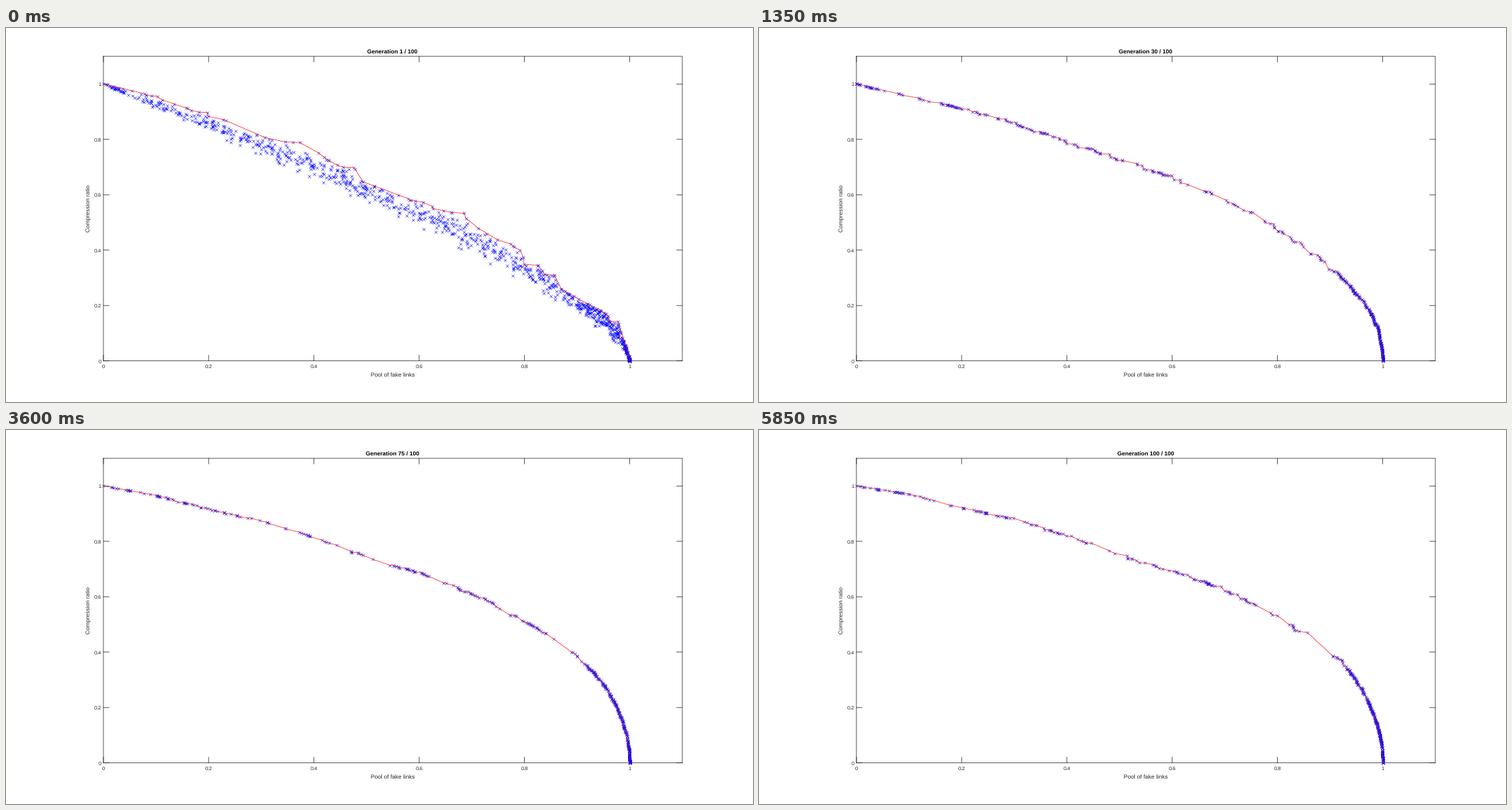
These frames come from a looping animation (1057x530 px, 6.3 s). A matplotlib script:

```python
import numpy as np
import matplotlib.pyplot as plt
from matplotlib.animation import FuncAnimation

W, H, DPI = 1057, 530, 100
PX = 72 / DPI
LEFT, RIGHT, TOP, BOTTOM = 137.9, 957.0, 40.1, 471.7
UNIT_X, UNIT_Y = (RIGHT - LEFT) / 1.1, (BOTTOM - TOP) / 1.1
GREY = "#262626"
GENERATIONS = [1, *range(10, 71, 10), *range(75, 101, 5)]

# Height of the front over KNOTS at generations 1, 20 and 100.
KNOTS = np.r_[np.arange(10) / 10, 0.95, 0.98, 1]
FIRST = [1, .952, .887, .812, .768, .660, .572, .520, .370, .240, .177, .12, 0]
EARLY = [1, .952, .908, .855, .786, .724, .656, .575, .468, .330, .230, .16, 0]
LAST = [1, .970, .921, .880, .822, .748, .694, .623, .526, .401, .297, .187, 0]


def bend(x):
    """Straightens the steep fall at x = 1, where the front is a root curve."""
    return np.sqrt(np.clip(1 - x, 0, 1))


def spread(x):
    u = bend(x)
    return (4 * u * (1 - u)) ** 0.7


def front_height(gen, x):
    early, last = np.array(EARLY), np.array(LAST)
    if gen < 20:
        mix = ((gen - 1) / 19) ** 0.7
        heights = np.array(FIRST) * (1 - mix) + early * mix
    else:
        lag = ((100 - gen) / 80) ** 1.2
        heights = last + (early - last) * lag
    return np.interp(bend(x), bend(KNOTS)[::-1], heights[::-1])


def along(gen, share):
    """Points at the given shares (0..1) of the front's length."""
    x = 1 - np.linspace(1, 0, 600) ** 2
    y = front_height(gen, x)
    dist = np.r_[0, np.cumsum(np.hypot(np.diff(x) * UNIT_X, np.diff(y) * UNIT_Y))]
    at = np.interp(np.clip(share, 0, 1), dist / dist[-1], x)
    return at, front_height(gen, at)


def front(gen, rng):
    """Members on the front, sorted into a falling staircase."""
    if gen == 1:
        share, jitter = rng.random(62), 0.009
    else:
        hubs = rng.choice(rng.random(120), 230) + rng.normal(0, 0.004, 230)
        share = np.r_[hubs, 1 - 0.17 * rng.random(200) ** 1.4]
        jitter = 0.006 if gen <= 40 else 0.004
    x, y = along(gen, np.r_[0, share, 1])
    x, y = (v + rng.normal(0, jitter, v.size) * spread(x) for v in (x, y))
    return np.sort(np.clip(x, 0, 1)), np.sort(np.clip(y, 0, 1))[::-1]


def first_cloud(line, rng):
    x = np.r_[rng.random(740) ** 0.8, 1 - 0.1 * rng.random(190) ** 2,
              0.04 * rng.random(14)]
    u = bend(x)
    half = 0.054 * spread(x)
    y = u - 0.42 * u * (1 - u) + half * np.clip(rng.normal(0, 0.5, x.size), -1.1, 1.1)
    top = np.interp(x, *line)
    y = np.where(y > top, top - rng.random(x.size) * half, y)
    return x, np.clip(y, 0, 1)


def followers(gen, rng):
    """Members that still lag behind the front in the early generations."""
    n, lag = (460, 0.014) if gen == 10 else (220, 0.007)
    share = rng.choice(rng.random(90), n) + rng.normal(0, 0.006, n)
    x, y = along(gen, share)
    off = np.minimum(rng.exponential(lag, n), 3 * lag) * spread(x)
    return np.clip(x - 0.3 * off, 0, 1), np.clip(y - off, 0, 1)


def population(gen):
    rng = np.random.default_rng(500 + gen)
    line = marks = front(gen, rng)
    if gen == 1:
        marks = np.hstack([line, first_cloud(line, rng)])
    elif gen <= 20:
        marks = np.hstack([line, followers(gen, rng)])
    return line, marks


def to_stage(points):
    x, y = points
    return LEFT + UNIT_X * x, BOTTOM - UNIT_Y * y


plt.rcParams["font.family"] = "Liberation Sans"
plt.rcParams["text.hinting"] = "none"
fig = plt.figure(figsize=(W / DPI, H / DPI), dpi=DPI, facecolor="white")
ax = fig.add_axes([0, 0, 1, 1])
ax.set_xlim(0, W)
ax.set_ylim(H, 0)
ax.axis("off")


def stroke(x, y):
    ax.plot(x, y, color=GREY, lw=0.75 * PX, zorder=1, snap=False)


def label(x, y, text, size=8.24, **kw):
    style = {"color": GREY, "ha": "center", "va": "baseline", **kw}
    return ax.text(x, y, text, fontsize=size * PX, **style)


stroke([LEFT, RIGHT, RIGHT, LEFT, LEFT], [TOP, TOP, BOTTOM, BOTTOM, TOP])
for k in range(6):
    x, y = to_stage((k / 5, k / 5))
    for edge, step in ((BOTTOM, -8), (TOP, 8)):
        stroke([x, x], [edge, edge + step])
    for edge, step in ((LEFT, 8), (RIGHT, -8)):
        stroke([edge, edge + step], [y, y])
    label(x, 482.3, f"{k / 5:g}", 7.4)
    label(134.5, y + 2.8, f"{k / 5:g}", 7.4, ha="right")
label(547, 493.7, "Pool of fake links")
label(119.6, 255.5, "Compression ratio", rotation=90, rotation_mode="anchor")
title = label(547, 36, "", weight="bold", color="black")

dots, = ax.plot([], [], "x", color="blue", ms=3.5 * PX, mew=0.5 * PX,
                zorder=3, snap=False)
curve, = ax.plot([], [], color="red", lw=0.65 * PX, zorder=4, snap=False)

STATES = [population(g) for g in GENERATIONS]


def draw(i):
    line, marks = STATES[i]
    curve.set_data(*to_stage(line))
    dots.set_data(*to_stage(marks))
    title.set_text(f"Generation {GENERATIONS[i]} / 100")
    return curve, dots, title


anim = FuncAnimation(fig, draw, frames=len(GENERATIONS), interval=450,
                     repeat=True, repeat_delay=0, blit=False)
plt.show()
```
